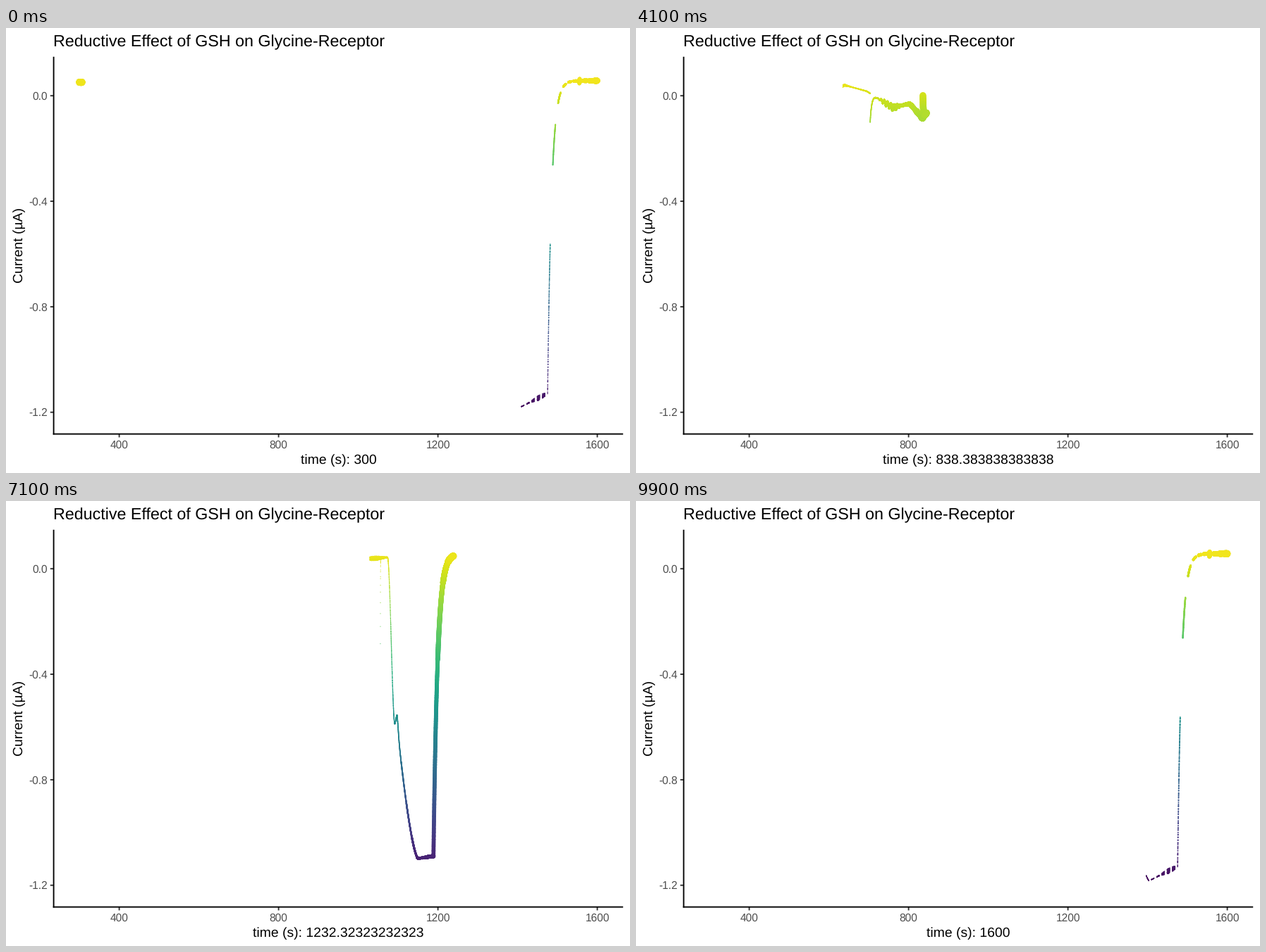
Recreate the animation shown at these times as a matplotlib script. Size 885 by 632 pixels, loop 10 s.

```python
import numpy as np
import matplotlib.pyplot as plt
from matplotlib.animation import FuncAnimation

W, H = 885, 632
FRAMES, WAKE = 100, 15
T0, T1, DT = 300, 1600, 0.05
PX = 0.72  # points per pixel at 100 dpi

plt.rcParams["font.family"] = "Liberation Sans"
plt.rcParams["text.hinting"] = "none"


def sx(t):
    return 160.6 + 0.565 * (t - 400)


def sy(current):
    return 96.2 - 374.6 * current


def ramp(t, start, end):
    return np.clip((t - start) / (end - start), 0, 1)


def bell(t, center, width):
    return np.exp(-((t - center) / width) ** 2)


def response(t, onset, fall, turn, floor, wash, fast, slow, rise, bump, tau):
    """Inward current of one dose: two-phase fall, slow rise, washout."""
    held = np.minimum(t, wash)
    u = ramp(held, onset, fall)
    depth = fast * u * u * (3 - 2 * u)
    depth += slow * (1 - (1 - ramp(held, turn, floor)) ** 1.5)
    depth -= rise * ramp(held, floor, wash) + bump * bell(held, turn, 4)
    return depth * np.exp(-np.maximum(t - wash, 0) / tau)


def baseline(t):
    base = np.interp(
        t,
        [390, 460, 540, 600, 640, 695, 760, 803, 835, 850, 912, 928, 960, 1020, 1200],
        [.051, .051, 0, .015, .04, .017, -.045, -.03, -.085, -.055, -.068,
         -.003, .021, .037, .057])
    ripple = 0.011 * np.sin(2 * np.pi * t / 8.1) * np.exp(-((t - 753) / 23) ** 4)
    return base + ripple - 0.045 * bell(t, 571, 6)


def artefact(t, start, size, tau):
    """Sudden jump that decays exponentially."""
    return np.where(t >= start, size * np.exp(-np.maximum(t - start, 0) / tau), 0)


def recording():
    rng = np.random.default_rng(4)
    t = np.arange(T0, T1, DT)
    value = baseline(t)
    value -= response(t, onset=388.5, fall=413.5, turn=422, floor=464.5, wash=518.5,
                      fast=.90, slow=.355, rise=.09, bump=.05, tau=9)
    value -= response(t, onset=1073.5, fall=1092, turn=1097.5, floor=1150, wash=1188.8,
                      fast=.638, slow=.512, rise=.005, bump=.037, tau=10.2)
    value -= response(t, onset=1330, fall=1362, turn=1355, floor=1404, wash=1475.3,
                      fast=.91, slow=.33, rise=.055, bump=0, tau=10)
    for start, size, tau in [(703.5, -.11, 4), (836, .085, 1), (1002.6, -.08, .1),
                             (1011.5, -.07, .15), (1055.5, -.33, .22)]:
        value += artefact(t, start, size, tau)

    noise = 0.001 + sum(a * bell(t, c, w) for c, w, a in [
        (625, 20, .006), (1040, 25, .008), (1289, 1.5, .028),
        (1455, 18, .009), (1555, 2, .01)])
    value += noise * rng.uniform(-1, 1, len(t))

    pos = (t - T0) / (T1 - T0) * (FRAMES - 1)
    step = np.rint(pos).astype(int)
    # Sparse stretches keep only the first half of each step
    sparse = (step == 1) | (step >= 82)
    keep = ~(sparse & (pos > step))
    color = plt.get_cmap("viridis")((value + 1.22) / 1.305)
    return np.column_stack([sx(t), sy(value)])[keep], color[keep], step[keep]


points, colors, steps = recording()
groups = [np.flatnonzero(steps == i) for i in range(FRAMES)]

fig = plt.figure(figsize=(W / 100, H / 100), dpi=100, facecolor="white")
ax = fig.add_axes([0, 0, 1, 1])
ax.set_xlim(0, W)
ax.set_ylim(H, 0)
ax.axis("off")


def label(x, y, text, size, color="black", **kw):
    return ax.text(x, y, text, fontsize=size * PX, color=color,
                   va="baseline", **kw)


def line(xs, ys, color):
    ax.plot(xs, ys, color=color, lw=1.88 * PX, solid_capstyle="butt",
            snap=False, zorder=3)


LEFT, RIGHT, TOP, BOTTOM = 67.6, 875.2, 40.8, 576.6
for t in range(400, 1601, 400):
    line([sx(t)] * 2, [BOTTOM, BOTTOM + 4.8], "#333333")
    label(sx(t), 596.6, str(t), 15.5, "#4d4d4d", ha="center")
for c in (0.0, -0.4, -0.8, -1.2):
    line([LEFT - 4.8, LEFT], [sy(c)] * 2, "#333333")
    label(59.2, sy(c) + 5.6, f"{c:.1f}", 15.5, "#4d4d4d", ha="right")
line([LEFT, LEFT], [TOP, BOTTOM + 0.9], "black")
line([LEFT - 0.9, RIGHT], [BOTTOM, BOTTOM], "black")

label(67, 26.7, "Reductive Effect of GSH on Glycine-Receptor", 23.24)
label(23.6, 308.7, "Current (µA)", 19.37, ha="center", rotation=90,
      rotation_mode="anchor")
clock = label(471.4, 619, "", 19.37, ha="center")
dots = ax.scatter([], [], linewidths=0, zorder=2)


def draw(i):
    # Oldest first, so the newest points lie on top
    ages = [(j, groups[(i - j) % FRAMES]) for j in range(WAKE, -1, -1)]
    idx = np.concatenate([g for _, g in ages])
    size = np.concatenate([np.full(len(g), 1.1 + 8.3 * (1 - j / WAKE) ** 2.5)
                           for j, g in ages])
    dots.set_offsets(points[idx])
    dots.set_sizes((size * PX) ** 2)
    dots.set_facecolors(colors[idx])
    now = T0 + (T1 - T0) * i / (FRAMES - 1)
    clock.set_text(f"time (s): {now:.15g}")
    return dots, clock


anim = FuncAnimation(fig, draw, frames=FRAMES, interval=100, repeat=True)
plt.show()
```
